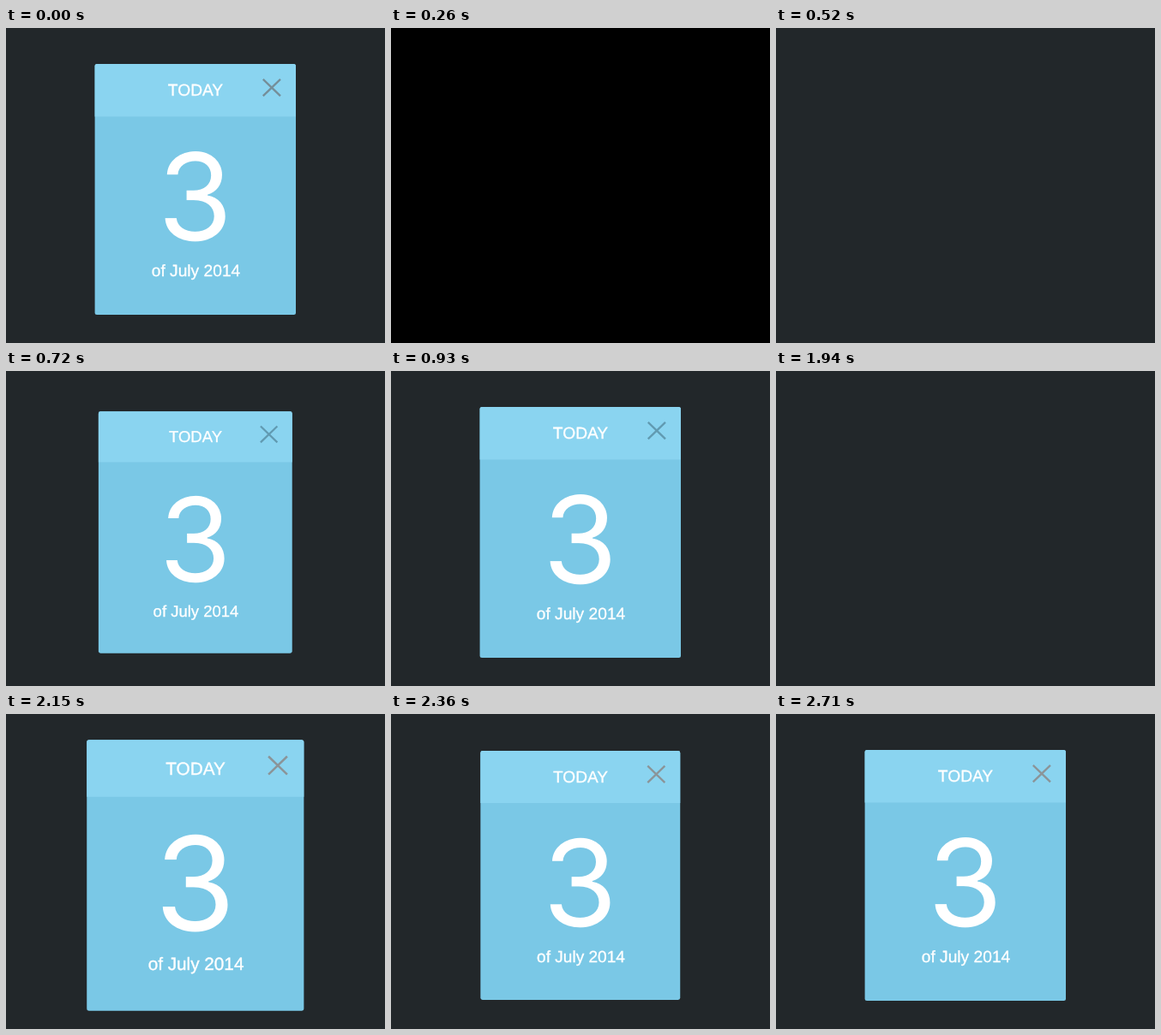
These frames come from a looping animation (442 by 368 pixels, 3060 ms). An HTML page:

```html
<!DOCTYPE html>
<html lang="en">
<head>
<meta charset="utf-8">
<title>Today card</title>
<style>
  html, body { margin: 0; width: 100%; height: 100%; overflow: hidden; background: #22272a; }
  svg { display: block; width: 442px; height: 368px; }
  text {
    font-family: "Liberation Sans", Arial, sans-serif;
    font-size: 19.2px;
    fill: #fff;
    stroke: #fff;
    stroke-width: 0.35;
    text-anchor: middle;
    text-rendering: geometricPrecision;
  }
  #day { font-family: Inter, "Liberation Sans", sans-serif; font-size: 141px; stroke: none; }
  #card { transform-origin: 220.8px 188.5px; }
  #cross { stroke-width: 2.3; fill: none; }
</style>
</head>
<body>
<svg viewBox="0 0 442 368">
  <rect id="backdrop" width="442" height="368"/>
  <g id="card">
    <rect x="103.6" y="42" width="234.4" height="293" rx="2.5" fill="#7ac8e6"/>
    <path d="M103.6 103.5V44.5a2.5 2.5 0 0 1 2.5-2.5H335.5a2.5 2.5 0 0 1 2.5 2.5V103.5Z" fill="#8ad4f0"/>
    <text x="221" y="79.4">TODAY</text>
    <path id="cross" d="M299.8 59.8L320 79.4M320 59.8L299.8 79.4"/>
    <text id="day" x="220.6" y="248.4">3</text>
    <text x="221.5" y="290.4">of July 2014</text>
  </g>
</svg>
<script>
  const LOOP = 3060, STEP = 70, PEAK = 210, OVERSHOOT = 0.08;
  const [backdrop, card, cross] = ["backdrop", "card", "cross"].map(id => document.getElementById(id));

  // Each scene cuts to black, clears to the backdrop, then springs the card in.
  const scenes = [
    { cut: 0, clear: 0, pop: 0, settle: 0, tint: "#758e99" },
    { cut: 260, clear: 520, pop: 580, settle: 930, tint: "#619ab1" },
    { cut: 1670, clear: 1940, pop: 1940, settle: 2430, tint: "#8b9498" }
  ];

  // Damped spring from 0 to 1 that overshoots most at PEAK.
  function spring(age) {
    const decay = -Math.log(OVERSHOOT) / PEAK, freq = Math.PI / PEAK;
    const swing = Math.cos(freq * age) + decay / freq * Math.sin(freq * age);
    return 1 - Math.exp(-decay * age) * swing;
  }

  function draw(now) {
    const time = now % LOOP;
    const scene = scenes.findLast(s => time >= s.cut);
    const age = Math.max(0, Math.floor((time - scene.pop) / STEP) * STEP);
    const settled = time >= scene.settle;

    backdrop.style.fill = time < scene.clear ? "#000" : "#22272a";
    card.style.transform = `scale(${settled ? 1 : spring(age)})`;
    card.style.opacity = settled ? 1 : Math.min(1, age / (2 * STEP));
    cross.style.stroke = scene.tint;
  }

  const start = performance.now();
  function tick() {
    draw(performance.now() - start);
    requestAnimationFrame(tick);
  }
  tick();
</script>
</body>
</html>
```
